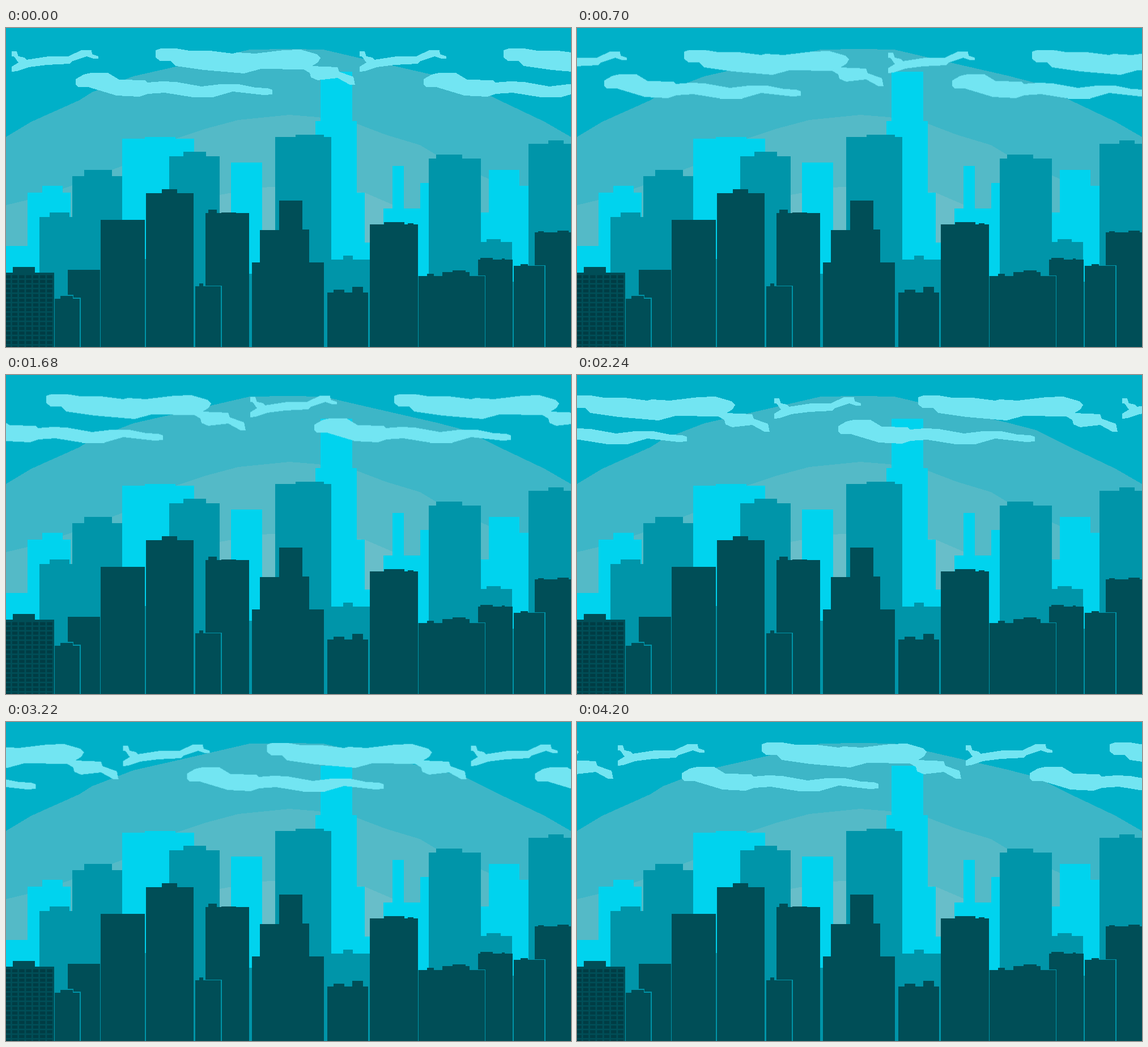
An HTML page without scripts that plays this animation: 997 by 562 pixels, repeating every 4340 ms.

```html
<!DOCTYPE html>
<html lang="en">
<head>
<meta charset="utf-8">
<title>City skyline</title>
<style>
html, body { margin: 0; width: 100%; height: 100%; overflow: hidden; background: #00b0c8; }
svg { display: block; width: 997px; height: 562px; shape-rendering: crispEdges; }
.halo-outer { fill: #3db6c7; }
.halo-middle { fill: #54bac7; }
.halo-inner { fill: #68bec9; }
.far { fill: #00d3ee; }
.mid { fill: #0095a9; }
.near { fill: #004e57; }
.edge { fill: none; stroke: #0095a9; stroke-width: 1.6; }
.clouds { fill: #72e5f2; animation: drift 4340ms infinite; }

/* The clouds move in 140 ms ticks, 31 ticks per loop. */
@keyframes drift {
  0% { transform: translate(0, 0); animation-timing-function: steps(5); }
  16.129% { transform: translate(-75px, 2.5px); animation-timing-function: steps(3); }
  25.8065% { transform: translate(-123px, 1px); animation-timing-function: steps(4); }
  38.7097% { transform: translate(-193px, -2.5px); animation-timing-function: steps(4); }
  51.6129% { transform: translate(-276px, 0); animation-timing-function: steps(4); }
  64.5161% { transform: translate(-359px, 1.5px); animation-timing-function: steps(6); }
  83.871% { transform: translate(-476px, 0); animation-timing-function: steps(4); }
  96.7742%, 100% { transform: translate(-552px, 0); animation-timing-function: step-end; }
}
</style>
</head>
<body>
<svg viewBox="0 0 997 562">
  <defs>
    <pattern id="windows" x="-1.5" y="435.5" width="12.3" height="8.27" patternUnits="userSpaceOnUse">
      <rect width="9.7" height="5.4" fill="#003c44"/>
    </pattern>
    <g id="cloud-bank">
      <polygon points="10,41 19,41 22,50 33,52 36,56 75,50 110,50 133,39 151,39 152,46 163,50 163,54 155,54 142,50 118,58 112,63 72,65 40,69 20,76 10,77 10,68 22,61 14,50 10,50"/>
      <polygon points="264,39 273,36 300,36 324,40 360,40 400,45 408,43 440,45 490,39 520,38 548,46 555,53 550,61 540,67 585,69 588,77 613,86 616,100 607,100 585,88 550,92 538,87 536,79 525,73 450,72 420,80 350,74 300,67 290,58 272,58 264,52"/>
      <polygon points="123,90 137,82 150,79 180,79 200,91 245,92 250,96 275,94 300,95 345,103 378,99 410,99 440,105 462,106 470,109 470,117 455,118 400,112 365,122 330,122 280,114 250,116 235,121 195,119 145,104 128,104 123,100"/>
    </g>
  </defs>

  <rect width="997" height="562" fill="#00b0c8"/>
  <polygon class="halo-outer" points="0,192 45,165 130,127 152,113 225,85 300,68 400,45 430,38 500,37 560,38 620,52 760,84 810,97 870,127 950,165 997,192 997,562 0,562"/>
  <polygon class="halo-middle" points="0,312 38,303 110,280 205,243 300,195 350,178 410,162 500,153 550,157 620,169 670,188 730,206 757,222 852,266 997,330 997,562 0,562"/>
  <polygon class="halo-inner" points="0,400 332,310 377,294 452,281 500,278 633,290 682,311 997,420 997,562 0,562"/>

  <g class="far">
    <path d="M 0 562 V 384 H 38 V 290 H 64 V 278 H 100 V 290 H 114 V 384 H 205 V 195 H 245 V 192 H 299 V 195 H 332 V 562 z"/>
    <path d="M 397 562 V 237 H 452 V 562 z"/>
    <path d="M 546 562 V 164 H 555 V 77 H 611 V 164 H 619 V 290 H 633 V 378 H 642 V 562 z"/>
    <path d="M 666 562 V 318 H 682 V 243 H 702 V 318 H 731 V 273 H 747 V 562 z"/>
    <path d="M 838 562 V 325 H 852 V 250 H 906 V 278 H 922 V 562 z"/>
  </g>

  <g class="mid">
    <path d="M 0 562 V 431 H 59 V 333 H 77 V 325 H 112 V 333 H 117 V 261 H 138 V 250 H 187 V 261 H 205 V 562 z"/>
    <path d="M 205 562 V 407 H 288 V 226 H 313 V 218 H 353 V 226 H 377 V 433 H 475 V 562 z"/>
    <path d="M 475 562 V 192 H 511 V 188 H 561 V 192 H 574 V 408 H 595 V 401 H 612 V 408 H 642 V 437 H 746 V 562 z"/>
    <path d="M 746 562 V 230 H 759 V 223 H 805 V 230 H 838 V 377 H 848 V 372 H 873 V 377 H 893 V 447 H 922 V 562 z"/>
    <path d="M 922 562 V 204 H 957 V 198 H 984 V 204 H 997 V 562 z"/>
  </g>

  <g class="near">
    <path d="M 0 562 V 431 H 12 V 421 H 51 V 431 H 85 V 562 z"/>
    <path d="M 109 562 V 426 H 166 V 562 z"/>
    <path d="M 167 562 V 338 H 245 V 562 z"/>
    <path d="M 247 562 V 291 H 275 V 284 H 302 V 291 H 331 V 562 z"/>
    <path d="M 352 562 V 326 H 357 V 320 H 372 V 326 H 380 V 325 H 406 V 326 H 429 V 562 z"/>
    <path d="M 434 562 V 413 H 448 V 356 H 482 V 304 H 523 V 355 H 535 V 413 H 561 V 562 z"/>
    <path d="M 567 562 V 466 H 578 V 461 H 597 V 466 H 611 V 456 H 630 V 466 H 639 V 562 z"/>
    <path d="M 642 562 V 346 H 667 V 342 H 703 V 346 H 709 V 344 H 719 V 346 H 727 V 562 z"/>
    <path d="M 933 562 V 360 H 939 V 358 H 949 V 360 H 973 V 357 H 993 V 360 H 997 V 562 z"/>
    <path d="M 833 562 V 408 H 837 V 405 H 859 V 408 H 875 V 406 H 880 V 408 H 894 V 562 z"/>
    <path d="M 86 562 V 477 H 96 V 472 H 118 V 477 H 130 V 562 z"/>
    <path d="M 334 562 V 455 H 341 V 450 H 348 V 455 H 380 V 562 z"/>
    <path d="M 728 562 V 437 H 743 V 433 H 755 V 437 H 770 V 430 H 788 V 427 H 811 V 430 H 818 V 437 H 845 V 562 z"/>
    <path d="M 896 562 V 419 H 908 V 416 H 921 V 419 H 951 V 562 z"/>
  </g>

  <g class="edge">
    <path d="M 109 471 H 118.5 V 476 H 130.7 V 562"/>
    <path d="M 348 454.5 H 380 V 562"/>
    <path d="M 818 436.5 H 845.5 V 562"/>
    <path d="M 895 447 V 562"/>
    <path d="M 921 418.5 H 951 V 562"/>
  </g>
  <rect y="435" width="83" height="127" fill="url(#windows)"/>

  <g class="clouds">
    <use href="#cloud-bank"/>
    <use href="#cloud-bank" x="614"/>
    <use href="#cloud-bank" x="1228"/>
  </g>
</svg>
</body>
</html>
```
